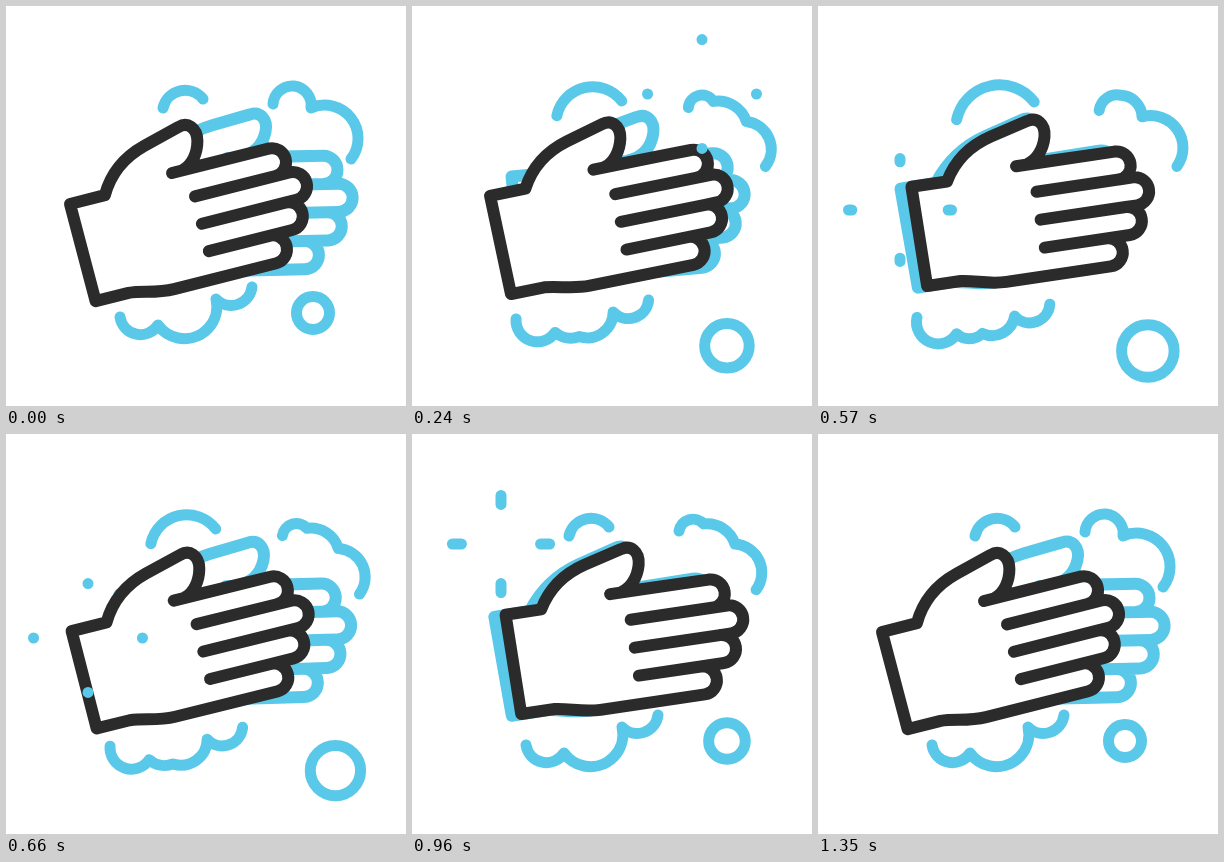
Animation of 400 by 400 pixels, one loop 1380 ms. Source, as an HTML page:

```html
<!DOCTYPE html>
<html lang="en">
<head>
<meta charset="utf-8">
<title>Hand washing</title>
<style>
  html, body { margin: 0; width: 100%; height: 100%; overflow: hidden; background: #fff; }
  svg { display: block; width: 100%; height: 100%; }
  path, circle { fill: none; stroke: #5ac8e8; stroke-width: 11; stroke-linecap: round; stroke-linejoin: round; }
  .hand { fill: #fff; stroke-width: 12; }
  .front { stroke: #2b2b2b; }
</style>
</head>
<body>
<svg viewBox="0 0 400 400">
  <path id="cap"/>
  <path id="cloud"/>
  <path id="foam"/>
  <circle id="bubble"/>
  <path id="back" class="hand"/>
  <path id="front" class="hand front"/>
  <path id="spark"/>
</svg>
<script>
const STEP = 30, FRAMES = 46;
const $ = id => document.getElementById(id);
const set = (id, attrs) => {
  for (const name in attrs) $(id).setAttribute(name, attrs[name]);
};
const mix = (a, b, k) => a + (b - a) * k;
const blend = (a, b, k) => a.map((v, i) => mix(v, b[i], k));
const clamp = x => Math.min(1, Math.max(0, x));
const smooth = u => u * u * (3 - 2 * u);
// One swing from 0 to 1 and back, then rest.
const swing = (f, length) => Math.sin(Math.PI * clamp(f / length));

// A chain of arcs: start point, then x, y, radius for every lobe.
function lobes([x, y, ...arcs], sweep) {
  let d = `M${x} ${y}`;
  for (let i = 0; i < arcs.length; i += 3)
    d += `A${arcs[i + 2]} ${arcs[i + 2]} 0 0 ${sweep} ${arcs[i]} ${arcs[i + 1]}`;
  return d;
}

const shapes = {
  cap: {
    rest: [157, 102, 197, 93, 22.7],
    full: [135, 116, 220, 96.5, 48]
  },
  cloud: {
    rest: [267, 98, 288, 80, 19.5, 305, 102, 19.5, 345, 153, 33.4],
    full: [267, 97, 292, 91, 13.6, 325, 111, 30, 344, 156, 28]
  },
  foam: {
    rest: [114, 311, 152, 319, 20.7, 172, 332, 32.3, 210, 293, 32.3, 246, 281, 21],
    full: [96, 302, 136, 320, 22, 163, 317, 16, 194, 304, 21, 229, 292, 20]
  }
};

function puff(id, k, dx, dy, sweep) {
  const { rest, full } = shapes[id];
  set(id, { d: lobes(blend(rest, full, k), sweep), transform: `translate(${dx} ${dy})` });
}

// Hand in its own axes: wrist corner at 0,0 and fingers along x.
function handPath(thumb, reach) {
  const tips = [206, 220.5, 209, 185.5].map(x => x + reach);
  const gap = 28.25, top = -5;
  const t = x => x + thumb;
  let d = `M0 0H36C${45 + thumb / 2} -16 ${t(60)} -31 ${t(86)} -38L${t(124)} -48`
    + `C${t(134)} -51 ${t(142)} -43 ${t(139)} -30C${t(136)} -18 ${t(128)} -8 118 -5.5`;
  let starts = "";
  tips.forEach((x, i) => {
    const y = top + i * gap, r = gap / 2;
    d += `L${x} ${y}A${r} ${r} 0 0 1 ${x} ${y + gap}`;
    starts += `M${i ? 123 : 106.5} ${y}H${x}`;
  });
  return d + "H80C62 108 50 102 35 100.5H1Z" + starts;
}

// Eight strokes per loop, slower in the middle.
function rub(f) {
  const v = Math.min(1, f / 22.5 - 1);
  const phase = 4 + 4 * (.84 * v + .16 * v ** 3) - .04 * (1 - v * v);
  return (1 - Math.cos(Math.PI * phase)) / 2;
}

// Four dashes shoot out of each centre, one burst after the other.
const bursts = [[290, 88], [82, 204], [89, 110]];
function sparkPath(f) {
  let d = "";
  bursts.forEach(([x, y], i) => {
    const age = f - 14 * i;
    if (age < 1 || age >= 10) return;
    const outer = mix(54.5, 20, (1 - age / 9) ** 3);
    const inner = Math.min(outer, mix(20, 54.5, smooth(clamp((age - 1) / 5.5))));
    for (const [dx, dy] of [[0, -1], [1, 0], [0, 1], [-1, 0]])
      d += `M${x + dx * inner} ${y + dy * inner}L${x + dx * outer + .01} ${y + dy * outer}`;
  });
  return d;
}

const place = (id, x, y, a) => set(id, { transform: `translate(${x} ${y}) rotate(${a})` });

function draw(f) {
  const grow = swing(f, 30) ** 2;
  const sink = swing(f, 29);
  const drift = swing(f, 40) ** 2;
  const ripple = f < 36 ? Math.min(1, 1.4 * Math.abs(Math.sin(Math.PI * f / 18))) : 0;

  puff("cap", grow, 0, 0, 1);
  puff("cloud", ripple, 17 * grow, 8 * grow, 1);
  puff("foam", grow, 0, 9 * sink, 0);
  set("bubble", { cx: 307 + 23 * drift, cy: 307 + 43 * sink, r: 16.5 + 5.2 * (drift + sink) });

  const p = rub(f), q = 1 - p;
  place("front", mix(64, 113, p), mix(198, 169.3, p), mix(-14.2, -4.6, p));
  place("back", mix(60.7, 115.2, q), mix(198.3, 159.3, q), mix(-14.8, -1.3, q));
  set("spark", { d: sparkPath(f) });
}

set("front", { d: handPath(0, 0) });
set("back", { d: handPath(6, -4) });

const begin = performance.now();
function tick() {
  const t = Math.max(0, performance.now() - begin);
  draw(Math.floor(t / STEP) % FRAMES);
  requestAnimationFrame(tick);
}
tick();
</script>
</body>
</html>
```
